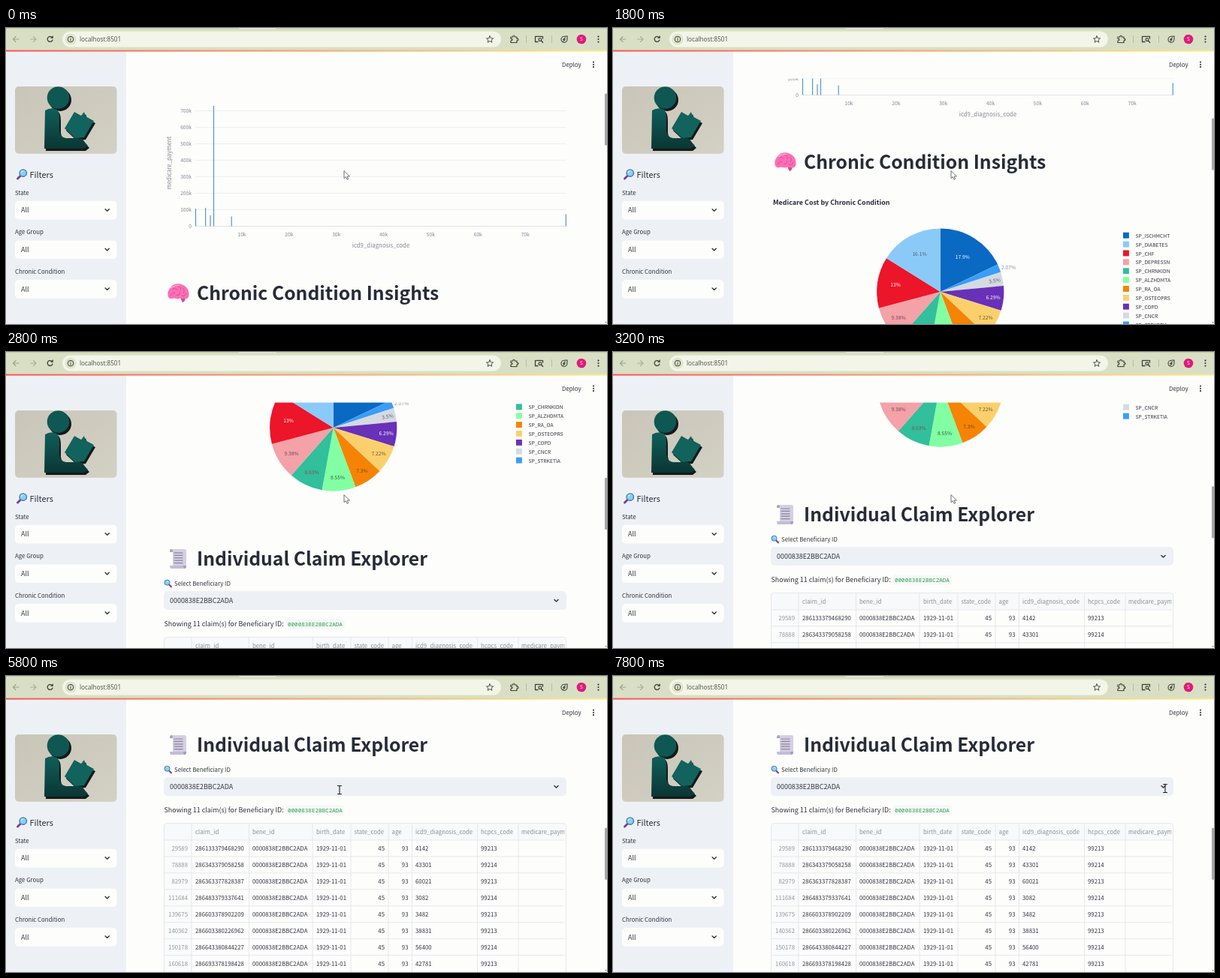
An HTML page that plays this animation: 800 px wide and 395 px high, repeating every 8000 ms.

```html
<!DOCTYPE html>
<html lang="en">
<head>
<meta charset="utf-8">
<title>Claims dashboard</title>
<style>
html, body { margin: 0; width: 100%; height: 100%; overflow: hidden; background: #fdfdfb; }
svg { display: block; width: 800px; height: 395px; }
text { font-family: "Noto Sans CJK JP", "Noto Sans CJK SC", "Noto Sans CJK KR", "Noto Sans CJK", "Noto Sans", sans-serif; white-space: pre; }
.url { font-family: "Open Sans", "Noto Sans", sans-serif; }
.code { font-family: "Noto Sans Mono", "DejaVu Sans Mono", monospace; }
</style>
</head>
<body>
<svg id="stage" viewBox="0 0 800 395"></svg>
<script>
const INK = '#31333f', DARK = '#282b38', MUTED = '#848794', LINE = '#e5e7ec';
const LOOP = 8000, TICK = 200;

// [time, page scroll]
const SCROLLS = [[0, 0], [200, 50], [800, 80], [1000, 112], [1200, 150], [1400, 175],
  [2000, 238], [2200, 301], [2600, 363], [2800, 426], [3000, 485], [5000, 520], [5200, 580], [5400, 610]];
// [time, x, y, is text cursor]
const POINTER = [[0, 450, 191, 0], [5600, 446, 158, 1], [5800, 444, 152, 1],
  [7200, 560, 151, 1], [7400, 690, 150, 1], [7600, 735, 150, 1]];

const rect = (x, y, w, h, fill, r = 0, extra = '') =>
  `<rect x="${x}" y="${y}" width="${w}" height="${h}" rx="${r}" fill="${fill}" ${extra}/>`;
const path = (d, fill = 'none', stroke = 'none', w = 1) =>
  `<path d="${d}" fill="${fill}" stroke="${stroke}" stroke-width="${w}" stroke-linecap="round" stroke-linejoin="round"/>`;
const line = (x1, y1, x2, y2, stroke, w = 1) =>
  `<path d="M${x1} ${y1}L${x2} ${y2}" stroke="${stroke}" stroke-width="${w}"/>`;
const circle = (x, y, r, fill, stroke = 'none', w = 1) =>
  `<circle cx="${x}" cy="${y}" r="${r}" fill="${fill}" stroke="${stroke}" stroke-width="${w}"/>`;

// Text centred vertically on y; CJK Latin glyphs are drawn 1.117 times larger per em.
function text(x, y, str, size = 8.75, fill = INK, { anchor = 'start', weight = 400, cls = '', turn = 0 } = {}) {
  const em = cls ? size : size / 1.117;
  const spin = turn ? `transform="rotate(${turn} ${x} ${y})"` : '';
  return `<text class="${cls}" x="${x}" y="${y + size * 0.33}" font-size="${em.toFixed(2)}" fill="${fill}" ` +
    `text-anchor="${anchor}" font-weight="${weight}" ${spin}>${str}</text>`;
}
const middle = { anchor: 'middle' }, end = { anchor: 'end' };
const bold = { weight: 700 };
const heading = (y, str) => text(254, y, str, 27.6, DARK, bold);
const chevron = (x, y) => path(`M${x - 2.6} ${y - 1.3}l2.6 2.6l2.6 -2.6`, 'none', INK, 1.4);
const dots = (x, y, step) => [-step, 0, step].map(d => circle(x, y + d, 1.05, INK)).join('');

function magnifier(x, y, s, flip = 1) {
  return `<g transform="translate(${x} ${y}) scale(${s * flip} ${s})">` +
    path('M-2 2.2L-5 5.2', 'none', '#7a3f96', 2.6) +
    circle(1.6, -1.6, 4.3, '#8ccdf5', '#3f78a8', 1.2) +
    path('M-.6 -2.2q.6 -1.8 2.4 -2', 'none', '#d9f1ff', 1) + '</g>';
}

function brain(x, y) {
  return `<g transform="translate(${x} ${y})">` +
    path('M-14 3C-15 -3 -11 -6 -9 -9C-5 -13 1 -13 5 -11C11 -9 14 -4 14 2C14 6 12 8 9 8C9 11 7 13 5 12L3 7C-1 9 -4 7 -6 7C-10 9 -14 7 -14 3Z', '#fb6fb4') +
    path('M3 7L5 12Q7 13 9 8Z', '#d8488f') +
    path('M-10 3Q-9 -1 -5 0M-8 -5Q-4 -8 -2 -4M-2 3Q2 4 2 -1M0 -9Q4 -7 3 -4M6 -6Q9 -4 7 0M5 4Q9 5 10 1', 'none', '#e0489a', 1) +
    path('M-9 -7Q-4 -11 1 -10', 'none', '#ffa3d0', 1.5) + '</g>';
}

function scroll(x, y) {
  const rows = [0, 1, 2, 3, 4].map(i => line(-5.5, -8 + i * 3.4, 6.5, -8 + i * 3.4, '#8a849e', 1.2)).join('');
  return `<g transform="translate(${x} ${y})">` +
    path('M-9 -13H9Q11 -13 11 -10V9H-7V-9H-11Q-11 -13 -9 -13Z', '#d4cfe2') +
    path('M-11 -9Q-11 -13 -9 -13Q-7 -13 -7 -9Z', '#a9a2bf') +
    rows + path('M-11 9H7Q7 13 9.5 13H-9Q-11 13 -11 9Z', '#c3bcd6') +
    path('M7 9H11Q11 13 9 13Q7 13 7 9Z', '#a39bbb') + '</g>';
}

function barChart() {
  let out = '';
  for (let i = 0; i <= 7; i++) {
    const y = 264.5 - i * 22;
    out += line(252, y, 746, y, i ? '#eceef2' : '#dfe2e8') +
      text(247, y, i ? `${i}00k` : '0', 7.5, MUTED, end);
    if (i) out += text(314 + (i - 1) * 62.85, 275.5, `${i}0k`, 7.5, MUTED, middle);
  }
  const bars = [[252.5, 241], [265.6, 240], [272, 250], [276.5, 104], [300.2, 251.5], [745.3, 248.5]];
  for (const [x, top] of bars) out += line(x, top, x, 264.5, '#4f95c8', 1.15);
  return out + text(499, 290.5, 'icd9_diagnosis_code', 8.75, MUTED, middle) +
    text(217, 180, 'medicare_payment', 8.75, MUTED, { anchor: 'middle', turn: -90 });
}

// Clockwise from the top: name, share, colour, label x, label y, label colour
const SLICES = [
  ['ISCHMCHT', 17.9, '#0969c3', 465.3, 481, '#fff'],
  ['STRKETIA', 2.07, '#3b9df6', 526.5, 495, '#8d9099'],
  ['CNCR', 3.5, '#d5dae2', 508, 512, '#555a66'],
  ['COPD', 6.29, '#6930b8', 506, 535, '#fff'],
  ['OSTEOPRS', 7.22, '#fbd06c', 496, 562, '#6b542c'],
  ['RA_OA', 7.3, '#f58404', 474, 585, '#7b4515'],
  ['ALZHDMTA', 8.55, '#83ffa3', 441.5, 594, '#2f5f45'],
  ['CHRNKIDN', 8.63, '#32bf9c', 407, 587, '#7d5348'],
  ['DEPRESSN', 9.38, '#f4a1a8', 380, 562, '#6d4a50'],
  ['CHF', 13, '#ec152a', 376, 518, '#fff'],
  ['DIABETES', 16.1, '#8acaf9', 408, 477, '#4f5f6c'],
];

function pieChart() {
  const cx = 435.7, cy = 527, r = 84.6;
  const total = SLICES.reduce((sum, s) => sum + s[1], 0);
  const rim = a => `${(cx + r * Math.sin(a)).toFixed(2)} ${(cy - r * Math.cos(a)).toFixed(2)}`;
  let angle = 0, wedges = '', labels = '', legend = '';
  for (const [name, share, fill, x, y, ink] of SLICES) {
    const next = angle + share / total * 2 * Math.PI;
    wedges += path(`M${cx} ${cy}L${rim(angle)}A${r} ${r} 0 0 1 ${rim(next)}Z`, fill);
    labels += text(x, y, share + '%', 7.5, ink,
      { anchor: 'middle', weight: ink === '#fff' ? 500 : 400, turn: name === 'CNCR' ? -9 : 0 });
    angle = next;
  }
  const ranked = [...SLICES].sort((a, b) => b[1] - a[1]);
  ranked.forEach(([name, , fill], i) => {
    const y = 452 + i * 11.88;
    legend += rect(679, y - 4.2, 7.9, 7.9, fill) + text(695.5, y + .3, 'SP_' + name, 7.5);
  });
  return text(213, 407.5, 'Medicare Cost by Chronic Condition', 9.95, DARK, bold) + wedges + labels + legend;
}

const BENE = '0000838E2BBC2ADA';
// Row index, claim, diagnosis, procedure
const CLAIMS = `29589 286133379468290 4142 99213
78888 286343379058258 43301 99214
82979 286363377828387 60021 99213
111684 286483379337641 3082 99214
139675 286603378902209 3482 99213
140362 286603380226962 38831 99213
150178 286643380844227 56400 99214
160618 286693378198428 42781 99213`.split('\n').map(row => row.split(' '));

function table() {
  const top = 806.5, headH = 22.5, rowH = 21.95, bottom = 1010;
  const heads = [[252, 'claim_id'], [328, 'bene_id'], [413, 'birth_date'], [463.5, 'state_code'],
    [513.5, 'age'], [545, 'icd9_diagnosis_code'], [632, 'hcpcs_code'], [686, 'medicare_payment']];
  let out = rect(210.5, top, 535, bottom - top, '#fdfdfc', 4) +
    rect(210.5, top, 535, headH, '#f7f9fa', 4) + rect(210.5, top + headH, 36.5, 190, '#fafbfb');
  for (const x of [247, 323.5, 408, 459, 509, 540.5, 627.5, 682]) out += line(x, top, x, bottom, LINE);
  for (const [x, name] of heads) out += text(x, top + 11.5, name, 8.7, '#8c8f9a');
  CLAIMS.forEach(([index, claim, code, hcpcs], i) => {
    const y = top + headH + i * rowH, mid = y + 11;
    out += line(210.5, y, 745.5, y, LINE) +
      text(242, mid, index, 8.7, '#92959f', end) + text(252, mid, claim, 8.7) + text(328, mid, BENE, 8.7) +
      text(413, mid, '1929-11-01', 8.7) + text(504, mid, '45', 8.7, INK, end) + text(535.5, mid, '93', 8.7, INK, end) +
      text(545, mid, code, 8.7) + text(632, mid, hcpcs, 8.7);
  });
  return `<g clip-path="url(#grid)">${out}</g>` + rect(210.5, top, 535, bottom - top, 'none', 4, `stroke="${LINE}"`);
}

function explorer() {
  return scroll(229, 702) + heading(701.5, 'Individual Claim Explorer') +
    magnifier(215.8, 735, .82, -1) + text(224, 735, 'Select Beneficiary ID') +
    rect(210, 745.3, 536, 24.7, '#edf0f5', 5) + text(218, 757.7, BENE, 10) + chevron(732.5, 757.7) +
    text(210.5, 788.5, 'Showing 11 claim(s) for Beneficiary ID:', 10) +
    rect(373, 782.5, 77.5, 13, '#f6f8f6', 2.5) +
    text(375, 789.5, BENE, 7.6, '#27a055', { cls: 'code' }) + table();
}

function photo() {
  const body = 'M52 110Q60 105 68 109Q71 112 71 122V137Q72 146 80 147H98Q103 148 105 153L109 157L104 161H51Z';
  const book = 'M91 112L100 117L104 112L106 118L117 124L104 146L92 147L78 134Z';
  return `<g clip-path="url(#photo)">` + rect(12, 78, 136, 90, 'url(#wall)') +
    `<g transform="translate(2 3)">${circle(70, 93, 15, '#131a1a') + path(body, '#131a1a') + path(book, '#131a1a')}</g>` +
    circle(69.5, 93, 14.8, '#0e5753') + path(body, 'url(#teal)') + path(book, '#12625d') + '</g>';
}

function sidebar() {
  let out = rect(0, 31, 160, 364, '#edf1f5') + photo() +
    magnifier(21, 195.3, 1.1) + text(31.5, 195.5, 'Filters', 12.2, DARK, { weight: 500 });
  ['State', 'Age Group', 'Chronic Condition'].forEach((label, i) => {
    const y = 220 + i * 52.6;
    out += text(12, y, label) + rect(12, y + 10.8, 135.5, 24.7, '#fdfefc', 5) +
      text(20, y + 23, 'All', 10) + chevron(134.7, y + 23);
  });
  return out;
}

function toolbar() {
  const ico = '#3c4137';
  return rect(0, 0, 800, 30, '#d9dfc5') + rect(0, 0, 800, 1.2, '#c6d2a6') + rect(310, 0, 50, 1.2, '#e6ebd6') +
    rect(75, 4.5, 584, 21, '#f3f5e8', 10.5) +
    path('M17 15H9.5M13 11.5L9.5 15L13 18.5', 'none', '#9da391', 1.1) +
    path('M32.5 15H40M36.5 11.5L40 15L36.5 18.5', 'none', '#a9ae9d', 1.1) +
    path('M61.4 12.6A3.5 3.5 0 1 0 62 16M62.2 11V13.2H60', 'none', ico, 1.3) +
    circle(86, 15, 7.6, '#dfe4cd') + circle(86, 15, 3.8, 'none', ico) +
    line(86, 14.4, 86, 17.2, ico) + line(86, 12.6, 86, 13.6, ico) +
    text(98, 15, 'localhost:8501', 8.2, '#4a4d45', { cls: 'url' }) +
    path('M644 10.6L645.3 13.6L648.5 13.9L646.1 16L646.8 19.2L644 17.5L641.2 19.2L641.9 16L639.5 13.9L642.7 13.6Z', 'none', ico, .9) +
    path('M672 12H674.7Q674.7 10 676 10Q677.3 10 677.3 12H680V14.2Q682 14.2 682 15.5Q682 16.8 680 16.8V19.5H672V17Q674 17 674 15.6Q674 14.2 672 14.2Z', 'none', ico, 1.2) +
    line(692.5, 10, 692.5, 20, '#b5bda0') + line(726.5, 10, 726.5, 20, '#b5bda0') +
    path('M708 18.5H704.5V11.3H714.5V14', 'none', ico, 1.3) + circle(711, 15.5, 1.9, 'none', ico, 1.2) +
    path('M712.4 17L714.6 19.2', 'none', ico, 1.4) +
    path('M747 10.8V15.3A4 4 0 1 1 743 11.2Q745.6 11.2 747 10.8ZM744.5 13L741.7 15.5H744.2L741.8 17.7', 'none', ico, 1.1) +
    circle(766, 15, 6.3, '#df1b78') + text(766, 15, 'S', 7, '#fff', { anchor: 'middle', cls: 'url' }) +
    dots(788.5, 15, 3.6) + rect(0, 29.5, 800, 2, 'url(#ribbon)');
}

document.getElementById('stage').innerHTML = `<defs>
  <clipPath id="view">${rect(160, 67.5, 637, 328, '#000')}</clipPath>
  <clipPath id="grid">${rect(210, 806, 533.5, 205, '#000')}</clipPath>
  <clipPath id="photo">${rect(12, 78, 135.5, 89.7, '#000', 5)}</clipPath>
  <linearGradient id="ribbon"><stop stop-color="#f95652"/><stop offset="1" stop-color="#f7ee88"/></linearGradient>
  <linearGradient id="wall" x2="1" y2="1"><stop stop-color="#c9c6b9"/><stop offset="1" stop-color="#d3d0c4"/></linearGradient>
  <linearGradient id="teal" x2="0" y2="1"><stop stop-color="#0f5f5a"/><stop offset="1" stop-color="#0a3634"/></linearGradient>
</defs>` + rect(0, 0, 800, 395, '#fdfdfb') +
  `<g clip-path="url(#view)"><g id="page">` + barChart() +
  brain(229.5, 353.5) + heading(353.5, 'Chronic Condition Insights') +
  pieChart() + explorer() + '</g></g>' + sidebar() + toolbar() +
  text(740, 48.7, 'Deploy') + dots(782, 48.7, 3.2) +
  `<g id="thumb">${rect(797, 87.5, 4, 69, '#a5a8a8', 1)}</g>` + path('M797 392.3H800L798.5 394Z', '#8a8d8d') +
  `<g id="arrow">${path('M0 0V9.6L2.3 7.6L4 11.3L5.7 10.5L4.1 7H7Z', '#fff', '#4c4d55', .8)}</g>` +
  `<g id="beam">${path('M-2.5 -5.5H2.5M0 -5.5V5.5M-2.5 5.5H2.5', 'none', '#1d1e22', 1.1)}</g>`;

const [page, thumb, arrow, beam] = ['page', 'thumb', 'arrow', 'beam'].map(id => document.getElementById(id));
const latest = (steps, t) => steps.filter(s => s[0] <= t).pop();
const move = (el, x, y) => el.setAttribute('transform', `translate(${x} ${y})`);

function draw(now) {
  const t = Math.floor(now % LOOP / TICK) * TICK;
  const offset = latest(SCROLLS, t)[1];
  const [, x, y, isText] = latest(POINTER, t);
  move(page, 0, -offset);
  move(thumb, 0, offset * 0.189);
  move(arrow, x, y);
  move(beam, x, y);
  arrow.style.display = isText ? 'none' : '';
  beam.style.display = isText ? '' : 'none';
}

const start = performance.now();
function frame() {
  draw(performance.now() - start);
  requestAnimationFrame(frame);
}
frame();
</script>
</body>
</html>
```
